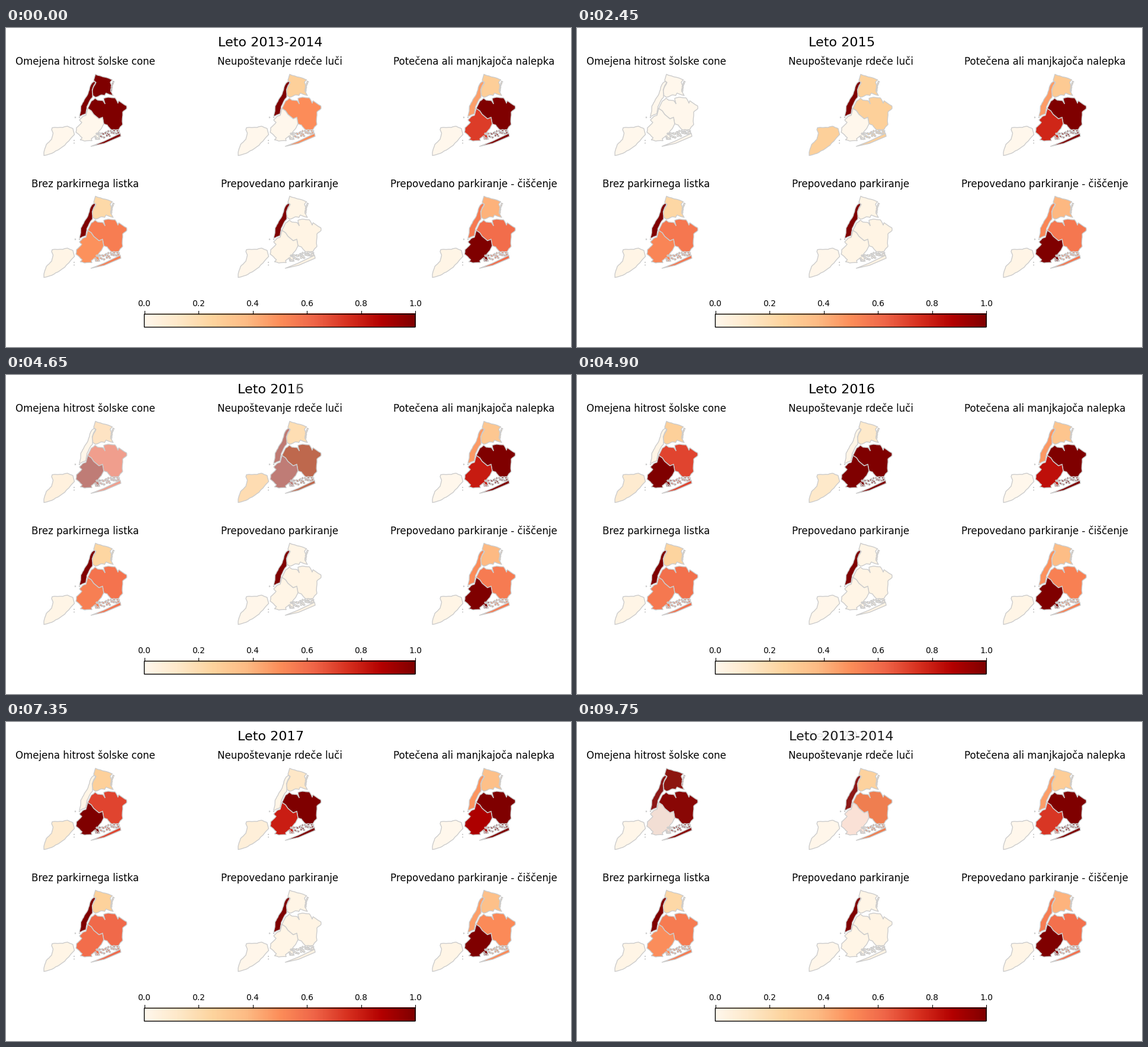
Write a matplotlib script that moves like this. It is 954 px wide and 539 px high and loops after 9.8 s.

```python
import numpy as np
import matplotlib
import matplotlib.pyplot as plt
from matplotlib.animation import FuncAnimation
from matplotlib.collections import PolyCollection
from matplotlib.patches import Rectangle

W, H, DPI = 954, 539, 100
STEP_MS, HOLD, FADE = 50, 40, 10
SPAN = HOLD + FADE - 1
MANHATTAN, BRONX, QUEENS, BROOKLYN, STATEN = range(5)

plt.rcParams["font.family"] = "DejaVu Sans"
cmap = matplotlib.colormaps["OrRd"]
rng = np.random.default_rng(4)


def coast(points, rough=0.06, rounds=2):
    """Roughen a polyline by shifting the middle of each piece sideways."""
    points = np.array(points, float)
    for _ in range(rounds):
        step = np.diff(points, axis=0)
        shift = rng.uniform(-rough, rough, (len(step), 1))
        middles = points[:-1] + step / 2 + shift * step[:, ::-1] * (-1, 1)
        points = np.insert(points, np.arange(1, len(points)), middles, axis=0)
    return points


def islet(x, y, r):
    angle = np.arange(6) * np.pi / 3
    radius = r * rng.uniform(0.55, 1.3, 6)
    return np.column_stack([x + radius * np.cos(angle), y + radius * np.sin(angle)])


# Key points of each outline, in pixels of the top left panel
land_border = [(138, 136), (144, 140), (148, 146), (157, 153.5), (163, 151), (165, 162)]
manhattan = [(124, 148.6), (126.4, 132), (132.2, 121), (139.3, 107.8), (145, 93),
             (148, 90.5), (151.5, 91), (145.5, 104.5), (146, 117), (136.7, 132.8),
             (134.8, 145), (126, 149)]
bronx = [(151, 78.2), (168, 83.3), (179.5, 87.5), (176, 92), (179, 99), (177, 107),
         (181, 114), (169, 110), (166.7, 114), (161, 113), (151, 117), (146.5, 114),
         (146, 105), (152, 92), (148, 88.5)]
queens_shore = [(171, 164), (178, 172), (190, 172), (197, 163), (197, 142), (204, 136),
                (203.5, 131.5), (190.5, 123), (189, 127), (184, 118), (172, 117),
                (165, 119), (167, 128), (164, 123), (155, 122), (150.5, 118.8),
                (144, 123.6)]
brooklyn_shore = [(161, 170), (155, 178), (158.6, 188), (152, 187), (149, 183),
                  (144, 187), (145, 190.5), (133, 191), (125.5, 189), (128.5, 185.5),
                  (118, 176), (119, 168.5), (128, 159.5), (124, 155.5), (129, 150),
                  (135, 147.5)]
staten = [(78, 168.5), (96, 168), (104, 166), (113, 170), (115.5, 180), (106, 191),
          (91, 204), (77, 212), (64, 215.5), (64, 210), (68, 197), (77, 188),
          (79.5, 178), (77, 172)]
rockaway = [(143.5, 200), (165, 191.5), (193, 178), (194, 183), (166, 195)]

shapes = [(MANHATTAN, coast(manhattan)), (BRONX, coast(bronx)), (STATEN, coast(staten)),
          (QUEENS, np.vstack([land_border, coast(queens_shore)])),
          (BROOKLYN, np.vstack([land_border, coast(brooklyn_shore)]))]
shapes += [(MANHATTAN, islet(x, 151, 0.7)) for x in (117, 124)]
shapes += [(STATEN, islet(115, y, 0.4)) for y in (190, 194.5)]
shapes += [(BRONX, islet(182 + 4 * np.sin(2 * y), y, 1.4)) for y in range(91, 107, 3)]
# Marsh islands of the bay, north of the long spit
for u in np.linspace(0, 1, 34):
    x, y = 151 + 40 * u, 184 - 10 * u + rng.uniform(-5, 5)
    shapes.append((QUEENS if x > 160 else BROOKLYN, islet(x, y, rng.uniform(1, 2.2))))
shapes.append((QUEENS, np.array(rockaway)))

# One level per borough, in the order of the constants above
LAST = 3


def drift(first, last):
    return [np.array(first) + (np.array(last) - first) * i / LAST for i in range(LAST + 1)]


school = [1, 1, 1, 0, 0], [0] * 5, *[[.02, .27, .7, 1, .1]] * 2
red_light = ([1, .27, .5, 0, 0], [1, .26, .27, 0, .27],
             [.02, .12, 1, 1, .12], [.02, .13, 1, .8, .07])
sticker = drift([.45, .28, 1, .72, 0], [.48, .35, 1, .89, 0])
ticket = drift([1, .22, .55, .49, .02], [1, .26, .61, .6, .02])
no_parking = [[1, .02, .03, .02, .01]] * (LAST + 1)
cleaning = drift([.56, .4, .6, 1, .02], [.45, .35, .51, 1, .02])

panels = {"Omejena hitrost šolske cone": school,
          "Neupoštevanje rdeče luči": red_light,
          "Potečena ali manjkajoča nalepka": sticker,
          "Brez parkirnega listka": ticket,
          "Prepovedano parkiranje": no_parking,
          "Prepovedano parkiranje - čiščenje": cleaning}
boroughs = [borough for borough, _ in shapes]
fills = [cmap(np.array(year, float)[:, boroughs].ravel())[:, :3]
         for year in zip(*panels.values())]

fig = plt.figure(figsize=((W + 1e-6) / DPI, (H + 1e-6) / DPI), dpi=DPI, facecolor="white")
ax = fig.add_axes([0, 0, 1, 1])


def label(x, y, text, size, ha="center"):
    return ax.text(x, y, text, fontsize=size, ha=ha, va="baseline", color="black")


outlines = []
for i, name in enumerate(panels):
    row, column = divmod(i, 3)
    dx, dy = 328 * column, 206 * row
    outlines += [points + (dx, dy) for _, points in shapes]
    label(134 + dx, 62 + dy + row, name, 12)
maps = PolyCollection(outlines, facecolors=fills[0], edgecolors="0.8", linewidths=1)
ax.add_collection(maps)

# Colour scale
left, right, top, bottom = 233.5, 691, 483.5, 505.5
ax.imshow(np.linspace(0, 1, 256)[None], cmap=cmap, extent=(left, right, bottom, top),
          aspect="auto", interpolation="nearest")
ax.add_patch(Rectangle((left, top), right - left, bottom - top, fill=False, lw=1,
                       snap=False))
for v in np.linspace(0, 1, 6):
    x = left + v * (right - left)
    ax.plot([x, x], [top - 5, top], color="black", lw=0.8)
    label(x, 470, f"{v:.1f}", 10)

ax.set(xlim=(0, W), ylim=(H, 0))
ax.axis("off")

# Short titles share a stem, so equal letters do not dip while fading
STEM = 97.8


def title(x, text):
    return label(x, 31, text, 16, "left")


long_x, short_x = 358, 390.6
short_stem = title(short_x, "Leto 201")
title_parts = [[title(long_x, "Leto 2013-2014")]]
title_parts += [[short_stem, title(short_x + STEM, digit)] for digit in "567"]


def draw(frame):
    now, step = divmod(frame, SPAN)
    then = (now + 1) % len(fills)
    mix = max(0, step - HOLD + 1) / FADE
    maps.set_facecolor((1 - mix) * fills[now] + mix * fills[then])
    weights = {part: 0 for parts in title_parts for part in parts}
    for index, weight in ((now, 1 - mix), (then, mix)):
        for part in title_parts[index]:
            weights[part] += weight
    for part, weight in weights.items():
        part.set_alpha(min(1, weight))
    return [maps, *weights]


anim = FuncAnimation(fig, draw, frames=SPAN * len(fills), interval=STEP_MS,
                     init_func=lambda: draw(0), repeat=True, repeat_delay=0)
plt.show()
```
